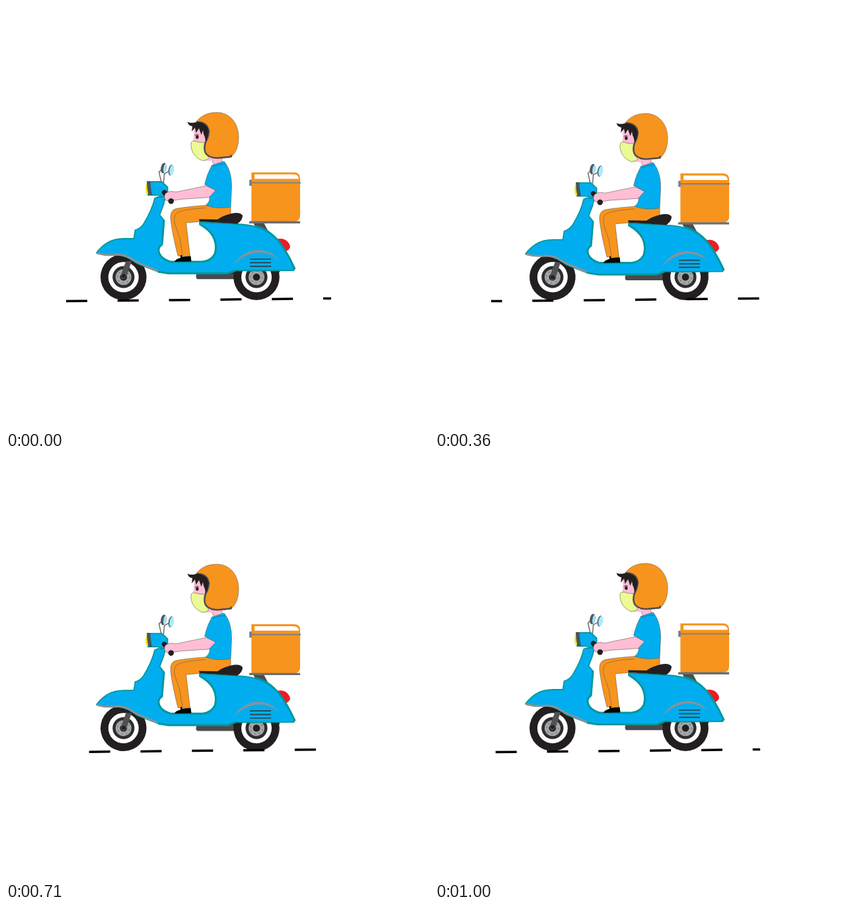
Recreate the animation shown at these times as an HTML page. Size 640 by 640 pixels, loop 1070 ms.

```html
<!DOCTYPE html>
<html lang="en">
<head>
<meta charset="utf-8">
<title>Scooter delivery</title>
<style>
html, body { margin: 0; width: 100%; height: 100%; overflow: hidden; background: #fff; }
svg { display: block; width: 100%; height: 100%; }
.line { fill: none; }
.thin { stroke: #6b5a4a; stroke-width: .6; }
.shell { fill: #00aeef; stroke: #00979b; stroke-width: 1.8; stroke-linejoin: round; }
.trim { fill: none; stroke: #00979b; stroke-width: 3; stroke-linejoin: round; }
.shirt { fill: #00aeef; }
.skin { fill: #ffbdd6; }
.orange { fill: #f7941d; }
.black { fill: #231f20; }
</style>
</head>
<body>
<svg viewBox="0 0 640 640">
  <defs>
    <g id="wheel">
      <circle r="34.8" class="black"/>
      <circle r="23" fill="#fff"/>
      <circle r="16.6" fill="#2f2d2e"/>
      <circle r="12" fill="#a3a5a8"/>
      <circle r="9" class="line" stroke="#58595b" stroke-width="1.3" stroke-dasharray="1.3 5.77"/>
      <circle r="5.4" class="black"/>
    </g>
    <pattern id="weave" width="4" height="4" patternUnits="userSpaceOnUse" patternTransform="rotate(20)">
      <rect width="4" height="4" fill="#eafa8c"/>
      <circle cx="1.5" cy="1.5" r=".7" fill="#fbffda"/>
    </pattern>
  </defs>

  <g class="bob">
    <path d="M288 405H350V413.300H290Q287.500 413 287.500 409Z" fill="#4a4a4c"/>
    <path d="M332 405L346 399H414V403H350V412H344V405Z" fill="#333132"/>
  </g>
  <g transform="translate(379 410.2)"><use href="#wheel" class="spin"/></g>
  <g transform="translate(177.8 410.2)"><use href="#wheel" class="spin"/></g>

  <g class="bob">
    <path d="M181.500 386H190L182.500 409Q180 414 176 413Q173 410 174.500 405Z" fill="#505153"/>
    <circle cx="178" cy="408.500" r="3" class="black"/>

    <!-- tail light, rack and box -->
    <path d="M409 353Q419 350 425.500 356Q431 362 429.500 366Q426 372 417 373Z" fill="#ed1c24"/>
    <path d="M374 328H390L398 343L380 339Z" fill="#4d4d4f"/>
    <path d="M371.300 251.700H436Q445 252 445 261V318Q444 326 436 326H371.300Z" class="orange"/>
    <path d="M376 254.800H435Q442.500 255 443 261.600H376Z" fill="#fff"/>
    <path d="M368.200 263H371.800V272H368.200Z" fill="#77787b"/>
    <path d="M369 267.500H446" stroke="#808285" stroke-width="2.2"/>
    <path d="M368 327.200H445" stroke="#6d6e71" stroke-width="3.4"/>

    <!-- mirrors -->
    <path d="M235 267L231.500 251L237 246M238.500 267L239.500 254L248 249" class="line" stroke="#58595b" stroke-width="1.3"/>
    <g transform="rotate(10 238.500 245.500)">
      <ellipse cx="238.300" cy="245.200" rx="4.1" ry="8" fill="#4e5b63"/>
      <ellipse cx="240.200" cy="245" rx="1.900" ry="6.800" fill="#9fe6fb"/>
    </g>
    <g transform="rotate(10 250 248.500)">
      <ellipse cx="249.600" cy="248.300" rx="4" ry="8.4" fill="#5b7480"/>
      <ellipse cx="250.700" cy="248.100" rx="3.100" ry="7.800" fill="#a8ecfc"/>
    </g>

    <!-- scooter shell -->
    <path class="shell" d="M137 373.500Q142 366 152 359Q163 352 179 352H193.500L195.500 339Q203 337 208 330
      Q221 309 225 291L229 289H241L238.500 300L232.500 316L239 324L236 361Q230 365 231 371
      Q233 382 249 387H297Q310 386 316 375Q320 361 313 348Q307 338 293 330V327
      L350 330C380 331 399 341 410 353C420 364 427 376 437 397L435 400L370 400.500L347 400L335 404.500H246L230 402
      Q212 395 199 390Q183 378 172 377Q156 377 137 373.500Z"/>
    <path class="trim" d="M239 324L236 361Q230 365 231 371Q233 382 249 387H297Q310 386 316 375
      Q320 361 313 348Q307 338 293 330"/>
    <path class="trim" d="M376 333C394 337 402 345 410 353C420 364 427 376 436.500 397L434 400"/>
    <path class="trim" d="M230 402L246 404.500H335L347 400.500"/>
    <path d="M138 374Q152 378 168 376Q181 376 190 383Q200 389 230 401" class="line" stroke="#8a9297" stroke-width="3"/>
    <path d="M343 393Q359 369 382 369Q402 370 414 385Q401 373 382 373Q361 374 343 393Z" fill="#8a9297"/>
    <path d="M369 383H401M369 388.400H401M369 393.800H401" stroke="#2e3f48" stroke-width="1.7"/>

    <!-- head lamp -->
    <path class="shell" d="M214 266H236L244.500 274V284L239 289L229 286H215Z"/>
    <path d="M213.500 266Q209 276 212.500 284.500H216V266Z" fill="#f3ea1a"/>
    <path d="M213 265H218.500Q219 277 221 286H215.500Q213 276 213 265Z" fill="#4b5459"/>

    <!-- legs and seat -->
    <path class="orange thin" d="M303 301.500Q269 304 256 307Q248 310 249 322Q251 342 260 378L278.500 379
      L272.500 328L296 326L326 324L340 317V304Z"/>
    <path class="line thin" d="M302 305.500Q272 307 261 312Q253 315 255 328L263 352L267 377"/>
    <path d="M255 387Q256 383 264 381L264 377H266.500V379.500L279.500 378.500L280.500 386.500Z" fill="#000"/>
    <path class="black" d="M292 322.500L320 323Q328 317 341 314Q354 311 358 317Q358 324 350 329.500L293 326Z"/>

    <!-- grip, arm and torso -->
    <path d="M239.500 282L250 294.500" stroke="#231f20" stroke-width="7.500" stroke-linecap="round"/>
    <path class="skin thin" d="M303 272L257 281.500Q248 279 242 283Q238 287 241 293Q245 297 250 293
      Q256 295 263 292.500L308 289.500L318 279Z"/>
    <circle cx="249.700" cy="295.300" r="4.200" class="black"/>
    <path class="skin thin" d="M310 230H326L328 238L315 241Z"/>
    <path class="shirt thin" d="M311.500 241Q320 238 330 235Q341.500 249 341.500 273L340 304Q319 308 302 301.500
      Q309 296 308 289L317 279L300.500 270Q304 254 311.500 241Z"/>
    <path class="line" stroke="#1d6a94" stroke-width=".8" d="M311.500 241L314 243Q322 238 332 239"/>

    <!-- head -->
    <path class="skin" d="M284 182Q285 195 283 206L302 212L307 186L300 178Z"/>
    <path class="skin" d="M300 226L312 231L313 234L300 234Z"/>
    <path d="M280.500 206Q282 203.500 286 204.500Q293 207 300 206.500L301 222L307 230Q303 234 297 234
      Q284 229 280.500 216Q279 210 280.500 206Z" fill="url(#weave)" class="thin"/>
    <ellipse cx="289.300" cy="198.300" rx="2.2" ry="2.700" class="black"/>
    <path d="M285.500 196Q288 193.500 291.500 195" class="line" stroke="#231f20" stroke-width=".9"/>
    <path class="orange thin" d="M288 175C296 165 306 161 319 161C339 161 352 178 352 198C352 212 348 222 340 229
      Q320 232 308 228Q298 221 302 208Q313 191 302 179Z"/>
    <path d="M288 175.500Q305 175 307 190Q306 199 302 206Q298 217 303 224Q309 230 320 230L340.500 228V225"
      class="line" stroke="#4d4d4f" stroke-width="2.400"/>
    <path class="black" d="M274.500 175.500Q281 178 288 175.500Q304 176 306.500 189Q306 199 301.500 206
      Q302 199 299 194L298 188L295.500 195L292 185L287.500 192L286 184L281 190L282 182Q276 181 274.500 175.500Z"/>
  </g>

  <line id="road" x1="85" y1="446.600" x2="492" y2="442.500" stroke="#000" stroke-width="3.500" stroke-dasharray="32 45.800"/>
</svg>
<script>
const LOOP = 1070, STEPS = 14, TICKS = 25;
const road = document.getElementById("road");
const bobs = document.querySelectorAll(".bob");
const wheels = document.querySelectorAll(".spin");

// Poses hold for 70 ms, two of them for 80 ms.
const startOf = i => 70 * i + (i > 3 ? 10 : 0) + (i > 10 ? 10 : 0);

function draw(now) {
  const t = now % LOOP;
  let i = STEPS;
  while (startOf(i) > t) i--;
  const tick = Math.ceil(i * TICKS / STEPS);
  const turn = tick / TICKS;
  const lift = 1 - Math.cos(2 * Math.PI * turn);
  road.setAttribute("stroke-dashoffset", -6 - 6.25 * tick);
  bobs.forEach(b => b.setAttribute("transform", `translate(0 ${lift})`));
  wheels.forEach(w => w.setAttribute("transform", `rotate(${-360 * turn})`));
}

const start = performance.now();
function loop() {
  draw(performance.now() - start);
  requestAnimationFrame(loop);
}
loop();
</script>
</body>
</html>
```
